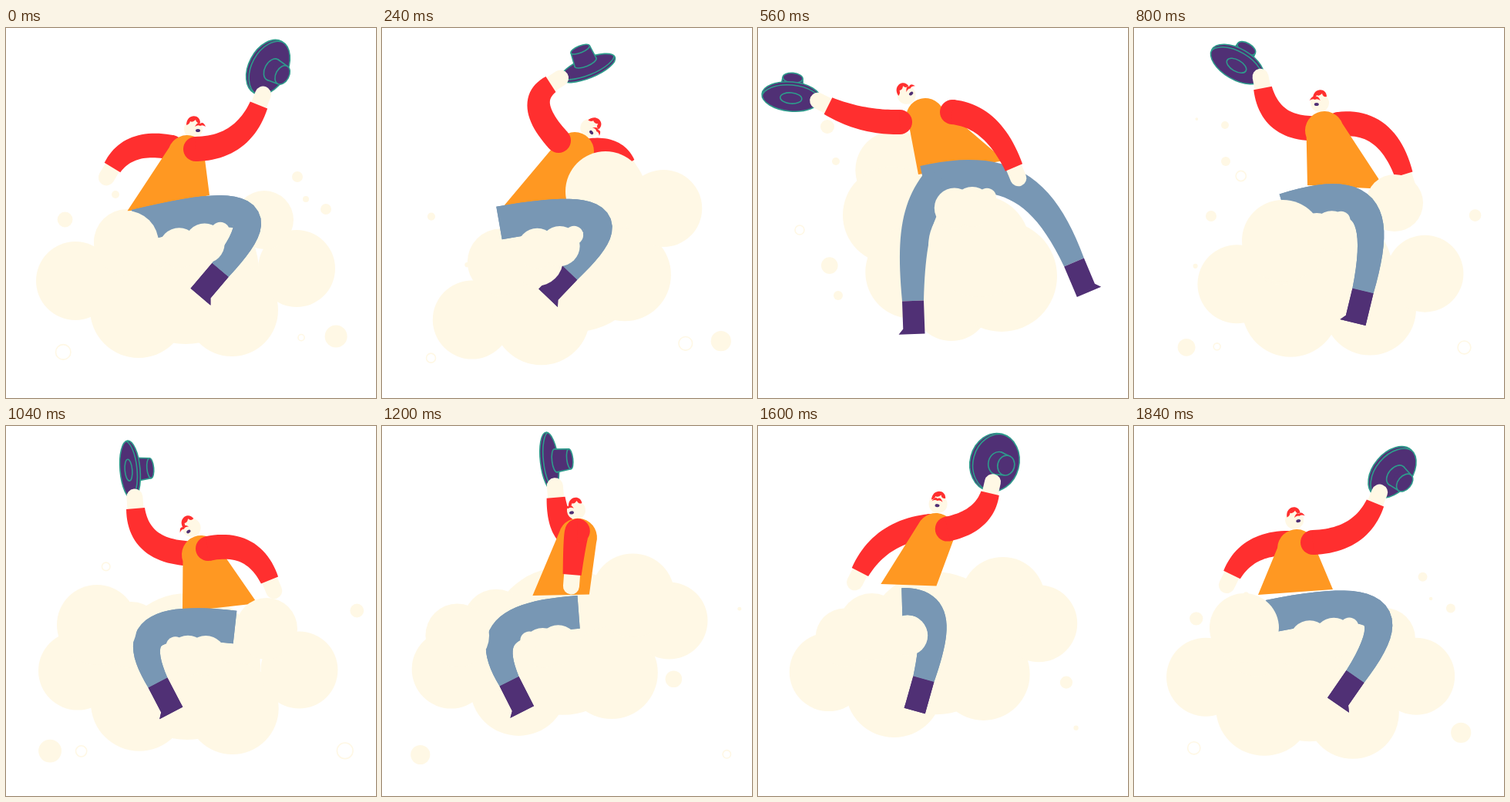
Animation, 480 px wide and 480 px high, one loop 1.92 s. Source, as an HTML page with a canvas:

```html
<!DOCTYPE html>
<html lang="en">
<head>
<meta charset="utf-8">
<title>Cloud rider</title>
<style>
html, body { margin: 0; width: 100%; height: 100%; overflow: hidden; background: #fff; }
canvas { display: block; width: 100vw; height: 100vh; }
</style>
</head>
<body>
<canvas id="stage" width="480" height="480"></canvas>
<script>
const ctx = document.getElementById('stage').getContext('2d');
const LOOP = 1920, STEP = 80, TAU = Math.PI * 2, RAD = Math.PI / 180;
const CREAM = '#fff8e5', RED = '#ff2f2f', ORANGE = '#ff9822', BLUE = '#7897b4',
  PURPLE = '#503075', TEAL = '#2e9c8c';

// Key poses of the rig.
// cloud: x y spread tilt.  cover, lap: puffs before the body and before the legs, x y r.
// torso: left hip, right hip, chest.  leg: hip, knee, ankle, toe side.
// hatArm, arm: shoulder, elbow, wrist.  head: x y turn tilt.
// hat: x y, brim depth (negative when seen from below), tilt.
const poses = [
  { t: 0, hatArmFront: true,
    cloud: [233, 343, 1, 0], cover: [335, 249, 38], lap: [156, 279, 42],
    torso: [157, 238, 264, 217, 235, 164], leg: [168, 257, 368, 208, 278, 314, 1],
    hatArm: [246, 157, 306, 156, 328, 100], arm: [215, 155, 160, 144, 138, 181],
    head: [243, 130, 1, 0], hat: [340, 51, 25, 118] },
  { t: 240, hatArmFront: true,
    cloud: [251, 327, 1, -27], cover: [290, 212, 52], lap: [200, 300, 35],
    torso: [157, 232, 250, 226, 250, 160], leg: [152, 253, 334, 221, 243, 317, 1],
    hatArm: [229, 146, 183, 96, 219, 73], arm: [265, 160, 303, 153, 317, 177],
    head: [270, 129, 1, 50], hat: [267, 52, 13, -22] },
  { t: 560, hatArmFront: true, armFront: true,
    cloud: [200, 275, 0.65, 70], cover: [316, 322, 72], lap: [287, 283, 66],
    torso: [208, 190, 320, 172, 217, 116], leg: [215, 200, 353, 169, 410, 304, 1],
    farLeg: [238, 195, 197, 241, 201, 354, -1],
    hatArm: [184, 122, 135, 123, 91, 101], arm: [252, 109, 304, 114, 332, 181],
    head: [192, 86, 1, -35], hat: [43, 89, -19, 5] },
  { t: 800,
    cloud: [255, 345, 0.85, 0], cover: [338, 227, 37], lap: [193, 276, 53],
    torso: [225, 204, 326, 209, 247, 133], leg: [195, 236, 333, 193, 297, 341, -1],
    hatArm: [228, 130, 177, 128, 167, 78], arm: [265, 125, 327, 117, 350, 190],
    head: [241, 96, -0.7, 0], hat: [134, 47, -20, 30] },
  { t: 1040, armFront: true,
    cloud: [235, 340, 1, 3], cover: [338, 263, 40], lap: [118, 258, 52],
    torso: [229, 241, 326, 230, 253, 167], leg: [297, 261, 151, 245, 197, 333, -1],
    hatArm: [232, 165, 172, 160, 168, 107], arm: [262, 159, 320, 147, 342, 200],
    head: [240, 131, -1, -35], hat: [161, 57, -13, 85] },
  { t: 1360, armFront: true,
    cloud: [235, 280, 1, -20], cover: [314, 181, 66], lap: [88, 285, 32],
    torso: [163, 198, 217, 206, 252, 123], leg: [205, 222, 128, 250, 151, 330, -1],
    hatArm: [258, 122, 284, 106, 282, 78], arm: [244, 114, 184, 125, 155, 186],
    head: [260, 86, -1, 15], hat: [272, 36, 34, 80] },
  { t: 1840, hatArmFront: true,
    cloud: [228, 347, 0.95, 3], cover: [325, 276, 40], lap: [143, 262, 45],
    torso: [161, 219, 258, 212, 211, 159], leg: [175, 247, 368, 208, 287, 325, 1],
    hatArm: [232, 151, 293, 149, 313, 100], arm: [205, 152, 148, 150, 127, 193],
    head: [208, 121, 0.8, -10], hat: [335, 60, 25, 130] }
];
// The far leg hides behind the near one unless it is posed.
for (const p of poses) p.farLeg ??= p.leg;

// Puffs around the middle of the cloud: x y r.
const PUFFS = [[-143, -15, 51], [-61, 22, 63], [60, 23, 60], [144, -31, 50], [-76, -65, 43]];

// Bubbles at their fullest: time, x, y, size.
const DOTS = [
  [1020, 58, 421, 15], [940, 450, 241, 10], [30, 75, 248, 10], [80, 432, 402, 15],
  [0, 415, 235, 7], [0, 378, 193, 7], [0, 389, 222, 4], [0, 142, 216, 5],
  [800, 119, 173, 6], [800, 100, 244, 7], [800, 118, 126, 5], [560, 90, 128, 9],
  [560, 101, 173, 5], [520, 95, 308, 11], [560, 104, 347, 6],
  [1360, 387, 330, 13], [1360, 342, 365, 7]
];
const RINGS = [
  [960, 101, 419, 8], [960, 436, 419, 11], [900, 135, 188, 8],
  [560, 54, 262, 6], [50, 72, 422, 10], [200, 392, 408, 9]
];

const lerp = (a, b, u) => a + (b - a) * u;

// Smooth cubic through the key values, softened so that poses settle.
function poseAt(t) {
  const n = poses.length;
  let i = n - 1;
  while (poses[i].t > t) i--;
  const [a, b, c, d] = [-1, 0, 1, 2].map(k => poses[(i + k + n) % n]);
  const [t0, t1, t2, t3] = [-1, 0, 1, 2].map(k => poses[(i + k + n) % n].t + LOOP * Math.floor((i + k) / n));
  const h = t2 - t1, u = (t - t1) / h, soft = 0.6 * h;
  const smooth = (p, q, r, s) => {
    const m1 = soft * (r - p) / (t2 - t0), m2 = soft * (s - q) / (t3 - t1);
    return lerp(q, r, u * u * (3 - 2 * u)) + u * (1 - u) * (m1 * (1 - u) - m2 * u);
  };
  const out = { ...(u < 0.5 ? b : c) };
  for (const k in b)
    if (Array.isArray(b[k])) out[k] = b[k].map((v, j) => smooth(a[k][j], v, c[k][j], d[k][j]));
  return out;
}

function fill(color) {
  ctx.fillStyle = color;
  ctx.fill();
}

function oval(x, y, rx, ry, tilt = 0) {
  ctx.beginPath();
  ctx.ellipse(x, y, rx, ry, tilt, 0, TAU);
}

function disc(x, y, r, color = CREAM) {
  oval(x, y, r, r);
  fill(color);
}

function poly(color, pts) {
  ctx.beginPath();
  pts.forEach(p => ctx.lineTo(...p));
  ctx.closePath();
  fill(color);
}

// Curve from a to b that bends towards a corner point.
function bend([ax, ay, kx, ky, bx, by], round) {
  const axis = (a, k, b) => {
    const p = lerp(a, k, round), q = lerp(b, k, round);
    return {
      at: t => lerp(lerp(lerp(a, p, t), lerp(p, q, t), t), lerp(lerp(p, q, t), lerp(q, b, t), t), t),
      slope: t => lerp(lerp(p - a, q - p, t), lerp(q - p, b - q, t), t)
    };
  };
  const x = axis(ax, kx, bx), y = axis(ay, ky, by);
  return t => {
    const dx = x.slope(t), dy = y.slope(t), len = Math.hypot(dx, dy) || 1;
    return { x: x.at(t), y: y.at(t), dx: dx / len, dy: dy / len };
  };
}

function limb(curve, w0, w1, color) {
  const one = [], two = [];
  for (let t = 0; t <= 1; t += 1 / 24) {
    const { x, y, dx, dy } = curve(t), r = lerp(w0, w1, t * t) / 2;
    one.push([x + dy * r, y - dx * r]);
    two.unshift([x - dy * r, y + dx * r]);
  }
  poly(color, [...one, ...two]);
}

function arm(a) {
  const curve = bend(a, 2 / 3), { x, y, dx, dy } = curve(1);
  ctx.beginPath();
  ctx.moveTo(x, y);
  ctx.lineTo(x + dx * 15, y + dy * 15);
  ctx.lineWidth = 21;
  ctx.lineCap = 'round';
  ctx.strokeStyle = CREAM;
  ctx.stroke();
  disc(a[0], a[1], 16, RED);
  limb(curve, 32, 24, RED);
}

function leg(a) {
  const curve = bend(a, 0.75), { x, y, dx, dy } = curve(1), toe = a[6];
  limb(curve, 43, 28, BLUE);
  const at = (side, down) => [x + dy * side + dx * down, y - dx * side + dy * down];
  const right = 14 + 6 * Math.max(toe, 0), left = 14 + 6 * Math.max(-toe, 0);
  poly(PURPLE, [at(-14, 0), at(14, 0), at(14, 36), at(right, 43), at(-left, 43), at(-14, 36)]);
}

// Small puffs tucked under the thigh.
function lapPuffs(a) {
  const curve = bend(a, 0.75);
  for (const [t, r] of [[0.12, 26], [0.23, 26], [0.33, 12]]) {
    const { x, y, dx, dy } = curve(t);
    const side = Math.sign(dy * (a[4] - x) - dx * (a[5] - y)), off = side * (r + 14);
    disc(x + dy * off, y - dx * off, r);
  }
}

function cloud([x, y, spread, deg]) {
  const c = Math.cos(deg * RAD) * spread, s = Math.sin(deg * RAD) * spread;
  disc(x, y - 28, 95 * spread);
  for (const [px, py, r] of PUFFS) disc(x + px * c - py * s, y + px * s + py * c, r);
}

function torso([lx, ly, rx, ry, x, y]) {
  const r = 25, ang = Math.atan2(y - (ly + ry) / 2, x - (lx + rx) / 2);
  ctx.beginPath();
  ctx.moveTo(lx, ly);
  ctx.arc(x, y, r, ang - Math.PI / 2, ang + Math.PI / 2);
  ctx.lineTo(rx, ry);
  fill(ORANGE);
}

function head([x, y, turn, deg]) {
  ctx.save();
  ctx.translate(x, y);
  ctx.rotate(deg * RAD);
  disc(0, 1, 12);
  ctx.beginPath();
  ctx.moveTo(-9, -4);
  ctx.bezierCurveTo(-9, -19, 9, -19, 9, -7);
  ctx.quadraticCurveTo(4, -6, 3, -11);
  ctx.quadraticCurveTo(-1, -7, -4, -9);
  ctx.quadraticCurveTo(-5, -5, -9, -4);
  fill(RED);
  ctx.translate(turn * 9, -4);
  ctx.beginPath();
  ctx.moveTo(-7, 2);
  ctx.quadraticCurveTo(-3, -5, 0, -2);
  ctx.quadraticCurveTo(4, -5, 7, 2);
  ctx.quadraticCurveTo(3, -1, 0, 1);
  ctx.quadraticCurveTo(-3, -1, -7, 2);
  fill(RED);
  oval(turn * -3, 7, 3, 2);
  fill(PURPLE);
  ctx.restore();
}

// Drawn upright, then tilted; the crown foreshortens as the brim opens.
function hat([x, y, depth, deg]) {
  const R = 38, flat = Math.abs(depth) / R, tall = 28 * Math.sqrt(Math.max(0, 1 - flat * flat));
  const above = depth > 0;
  const ring = (cy, r) => { oval(0, cy, r, r * flat); fill(PURPLE); ctx.stroke(); };
  const crown = () => {
    const base = -tall * 0.3;
    ring(base, 15);
    poly(PURPLE, [[-15, base], [-13, -tall], [13, -tall], [15, base]]);
    for (const s of [-1, 1]) {
      ctx.beginPath();
      ctx.moveTo(15 * s, base);
      ctx.lineTo(13 * s, -tall);
      ctx.stroke();
    }
    ring(-tall, 13);
  };
  ctx.save();
  ctx.translate(x, y);
  ctx.rotate(deg * RAD);
  ctx.strokeStyle = TEAL;
  ctx.lineWidth = 1.6;
  if (!above) crown();
  ring(0, R);
  ctx.save();
  ctx.clip();
  oval(0, above ? -4 : 4, R, R * flat);
  ctx.stroke();
  ctx.restore();
  if (above) crown();
  else ring(2, 14);
  ctx.restore();
}

// Each bubble drifts away from the cloud, swelling and shrinking.
function bubbles(list, t, hollow) {
  for (const [peak, x, y, size] of list) {
    const age = (t - peak + 1.5 * LOOP) % LOOP - LOOP / 2, u = age / (30 * size);
    if (Math.abs(u) >= 1) continue;
    const dir = Math.atan2(y - 300, x - 240), go = age * 0.055, r = size * (1 - u * u);
    oval(x + Math.cos(dir) * go, y + Math.sin(dir) * go, r, r);
    ctx.lineWidth = 1.6;
    ctx.fillStyle = ctx.strokeStyle = CREAM;
    hollow ? ctx.stroke() : ctx.fill();
  }
}

function draw(t) {
  const p = poseAt(t);
  const hatArm = () => { hat(p.hat); arm(p.hatArm); };
  ctx.fillStyle = '#fff';
  ctx.fillRect(0, 0, 480, 480);
  bubbles(DOTS, t, false);
  bubbles(RINGS, t, true);
  cloud(p.cloud);
  if (!p.hatArmFront) hatArm();
  if (!p.armFront) arm(p.arm);
  head(p.head);
  torso(p.torso);
  disc(...p.cover);
  leg(p.leg);
  leg(p.farLeg);
  disc(...p.lap);
  lapPuffs(p.leg);
  if (p.armFront) arm(p.arm);
  if (p.hatArmFront) hatArm();
}

const start = performance.now();
function tick() {
  const t = (performance.now() - start) % LOOP;
  draw(Math.floor(t / STEP) * STEP);
  requestAnimationFrame(tick);
}
tick();
</script>
</body>
</html>
```
